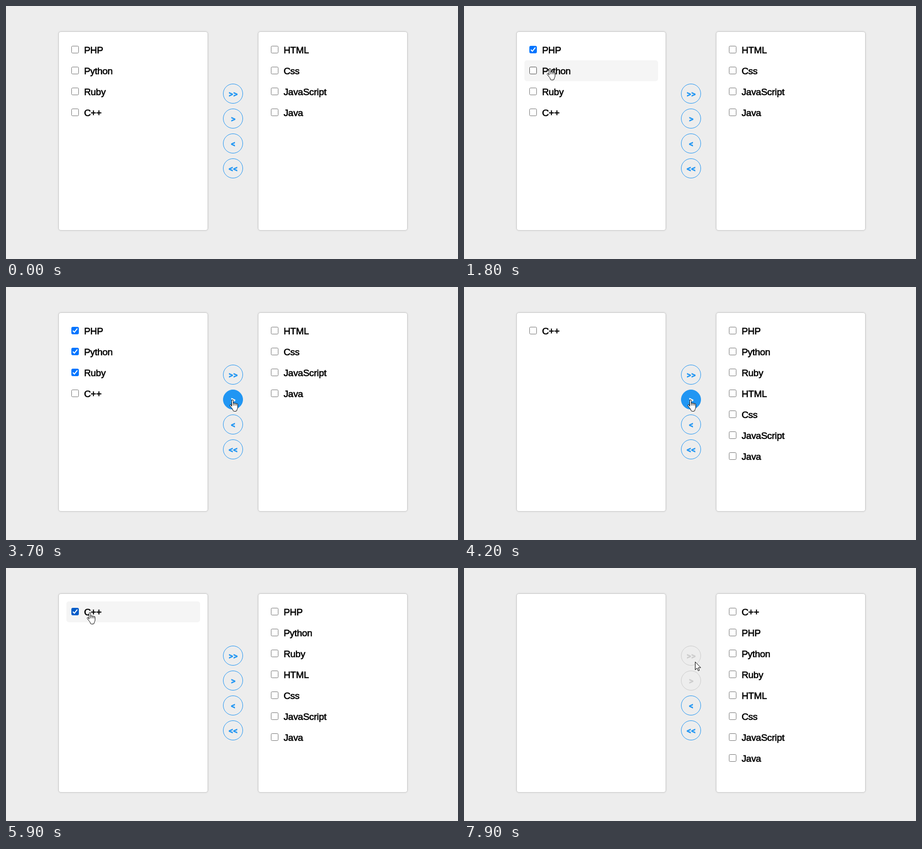
Recreate the animation shown at these times as an HTML page. Size 906 px wide and 508 px high, loop 8 s.

```html
<!DOCTYPE html>
<html lang="en">
<head>
<meta charset="utf-8">
<title>List transfer</title>
<style>
  html, body { margin: 0; width: 100%; height: 100%; overflow: hidden; background: #ededed; }
  svg { display: block; width: 906px; height: 508px; }
  .panel { fill: #fff; stroke: #ccc; filter: drop-shadow(0 0 1.5px rgba(0, 0, 0, .13)); }
  .label { font: 19px "Liberation Sans", Arial, sans-serif; letter-spacing: -.28px; stroke: #000; stroke-width: .65px; }
  .sign { font: bold 18px Roboto, Arial, sans-serif; text-anchor: middle; stroke-width: .3px; }
  .tick { fill: none; stroke: #fff; stroke-width: 2.1px; }
  .cursor { fill: #fff; stroke: #000; stroke-width: 1px; stroke-linejoin: round; }
</style>
</head>
<body>
<svg id="stage" viewBox="0 0 906 508"></svg>
<script>
const LOOP = 8000, FRAME = 100, ENTER = 200;
const ROW = 42, TOP = 67;
const BLUE = '#2196f3', GREY = '#ccc';
const FIRST_MOVE = 4200, SECOND_MOVE = 7000;

// Pointer glides: start time, number of frames, place reached.
const glides = [
  { at: 200, frames: 4, x: 188, y: 80 },
  { at: 600, frames: 2, x: 172, y: 86 },
  { at: 1500, frames: 2, x: 172, y: 122 },
  { at: 1800, frames: 1, x: 171, y: 125 },
  { at: 2300, frames: 2, x: 171, y: 166 },
  { at: 3100, frames: 1, x: 196, y: 172 },
  { at: 3200, frames: 2, x: 422, y: 222 },
  { at: 3500, frames: 3, x: 453, y: 226 },
  { at: 4500, frames: 4, x: 232, y: 103 },
  { at: 4900, frames: 2, x: 187, y: 92 },
  { at: 5200, frames: 2, x: 167, y: 89 },
  { at: 6100, frames: 4, x: 520, y: 222 },
  { at: 6500, frames: 2, x: 467, y: 224 },
  { at: 7800, frames: 2, x: 463, y: 188 }
];

const front = ['PHP', 'Python', 'Ruby'];
const back = ['HTML', 'Css', 'JavaScript', 'Java'];
const pressed = { 'PHP': 1300, 'Python': 2000, 'Ruby': 2800, 'C++': 5800 };

const stage = document.getElementById('stage');

function add(parent, tag, attrs = {}, content = '') {
  const node = document.createElementNS('http://www.w3.org/2000/svg', tag);
  set(node, attrs);
  node.textContent = content;
  return parent.appendChild(node);
}

function set(node, attrs) {
  for (const key in attrs) node.setAttribute(key, attrs[key]);
}

function show(node, on) {
  node.setAttribute('visibility', on ? 'visible' : 'hidden');
}

for (const x of [105.5, 505.5])
  add(stage, 'rect', { class: 'panel', x, y: 51.5, width: 299, height: 399, rx: 4.5 });

const rowHover = add(stage, 'rect', { x: 121, width: 268, height: ROW, rx: 5, fill: '#f5f5f5' });

const rows = {};
for (const name of [...front, 'C++', ...back]) {
  const group = add(stage, 'g');
  const box = add(group, 'rect', { x: .5, y: 13.5, width: 14, height: 14, rx: 2 });
  const tick = add(group, 'path', { class: 'tick', d: 'M3 20.8L6.1 23.8L12 16.4' });
  add(group, 'text', { class: 'label', x: 25.4, y: 28 }, name);
  rows[name] = { group, box, tick };
}

const buttons = ['>>', '>', '<', '<<'].map((sign, i) => {
  const y = 176 + 50 * i;
  const ring = add(stage, 'circle', { cx: 455, cy: y, r: 19.5 });
  const text = add(stage, 'text', { class: 'sign', x: 455.3, y: y + 6.7 }, sign);
  return { y, ring, text, forward: i < 2 };
});

const arrow = add(stage, 'path', {
  class: 'cursor',
  d: 'M.5 .6V16.4L4.1 13L6.5 18.4L8.9 17.4L6.6 12.1H11.5Z'
});
const hand = add(stage, 'g', { class: 'cursor' });
add(hand, 'path', {
  d: 'M-.5 13.5V2.1a1.6 1.6 0 0 1 3.2 0V8c.2-1.6 3-1.5 3.2.2c.3-1.5 2.9-1.2 3.1.6' +
     'c.4-1.2 2.5-.9 2.5 1V15.5c0 2.6-1.5 3.4-1.6 5.4Q9.8 23.5 7 23.5H4.5Q2 23.5 1.8 21' +
     'C1.5 18.8-.6 17.4-1.8 15.6L-4.2 12.4C-5 10.8-3.2 9.6-2 10.8Z'
});
add(hand, 'path', { fill: 'none', d: 'M2.7 7.5V12M5.9 8V12M9 8.6V12' });

const smooth = u => u * u * (3 - 2 * u);

function pointerAt(t) {
  const now = Math.floor(t / FRAME) * FRAME;
  let x = 103, y = 0;
  for (const glide of glides) {
    if (now < glide.at) break;
    const k = smooth(Math.min(1, ((now - glide.at) / FRAME + 1) / glide.frames));
    x += (glide.x - x) * k;
    y += (glide.y - y) * k;
  }
  return { x, y };
}

function listsAt(t) {
  if (t < FIRST_MOVE) return [[...front, 'C++'], back];
  if (t < SECOND_MOVE) return [['C++'], [...front, ...back]];
  return [[], ['C++', ...front, ...back]];
}

function drawRow(name, t, side, index, hovered) {
  const { group, box, tick } = rows[name];
  const down = side === 0 ? pressed[name] : Infinity;
  const active = t >= down && t < down + FRAME;
  const checked = t >= down + FRAME;
  const line = active ? '#8d8d8d' : hovered ? '#4f4f4f' : '#767676';
  const fill = hovered ? '#005cc8' : '#0075ff';
  set(group, { transform: `translate(${131 + 400 * side} ${TOP + ROW * index})` });
  set(box, { fill: checked ? fill : '#fff', stroke: checked ? fill : line });
  show(tick, checked);
}

function drawButton(button, enabled, hovered) {
  const color = enabled ? BLUE : GREY;
  const ink = hovered ? '#fff' : color;
  set(button.ring, { fill: hovered ? BLUE : 'none', stroke: color });
  set(button.text, { fill: ink, stroke: ink });
}

function render(t) {
  const lists = listsAt(t);
  const present = t >= ENTER;
  const { x, y } = pointerAt(t);

  const index = Math.floor((y - TOP) / ROW);
  const onRow = present && x >= 121 && x < 389 && index >= 0 && index < lists[0].length;
  show(rowHover, onRow);
  if (onRow) set(rowHover, { y: TOP + ROW * index });
  lists.forEach((list, side) => list.forEach((name, i) =>
    drawRow(name, t, side, i, onRow && side === 0 && i === index)));

  let onButton = false;
  for (const button of buttons) {
    const enabled = !button.forward || lists[0].length > 0;
    const hovered = enabled && Math.hypot(x - 455, y - button.y) < 20;
    onButton = onButton || hovered;
    drawButton(button, enabled, hovered);
  }

  const pointing = onRow || onButton;
  show(hand, present && pointing);
  show(arrow, present && !pointing);
  set(pointing ? hand : arrow, { transform: `translate(${Math.round(x)} ${Math.round(y)})` });
}

const start = performance.now();
function tick(now) {
  render(Math.max(0, now - start) % LOOP);
  requestAnimationFrame(tick);
}
render(0);
requestAnimationFrame(tick);
</script>
</body>
</html>
```
